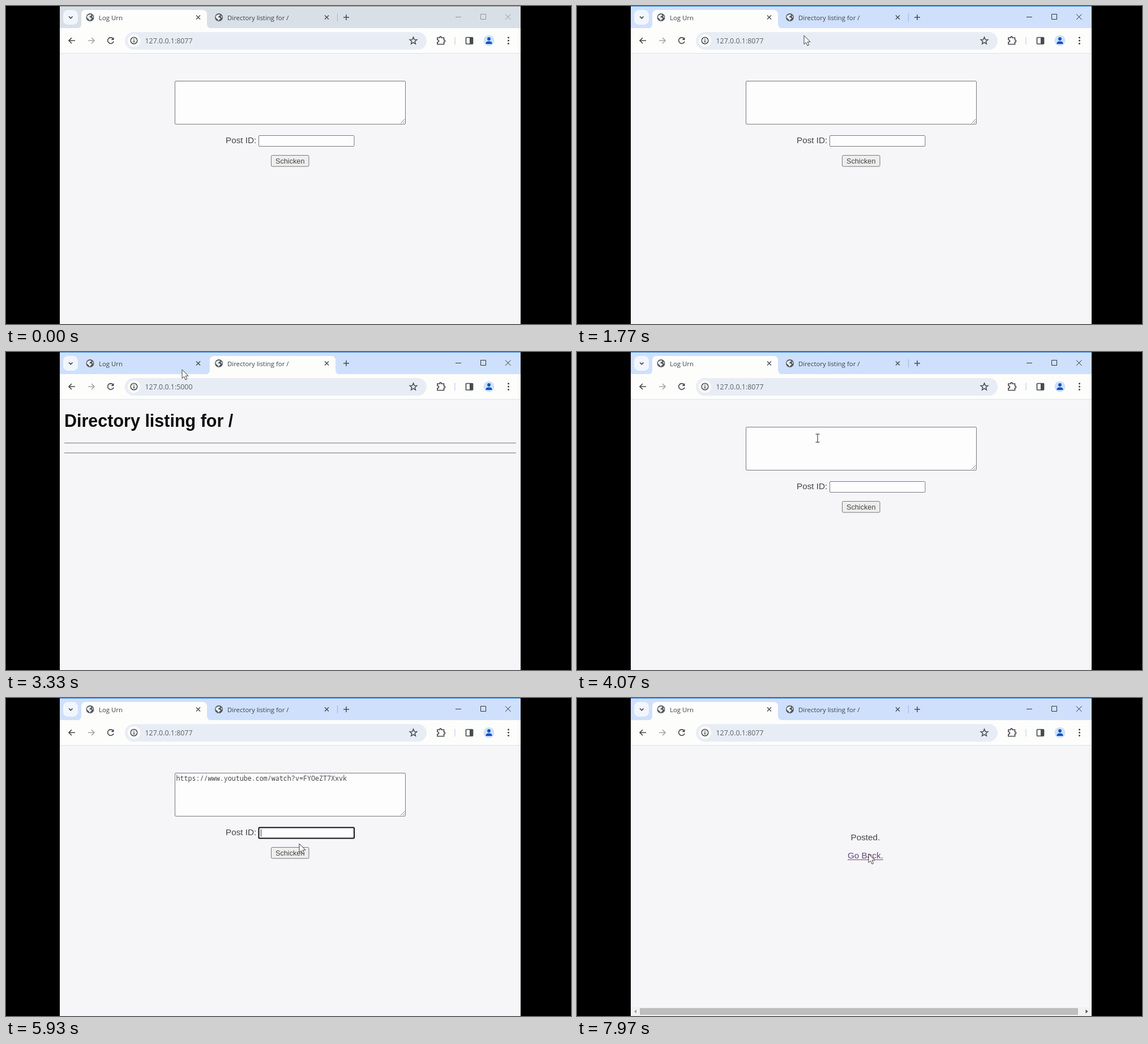
These frames come from a looping animation (998 px wide and 561 px high, 8000 ms). An HTML page:

```html
<!DOCTYPE html>
<html lang="de">
<head>
<meta charset="utf-8">
<title>Browser</title>
<style>
  html, body { margin: 0; width: 100%; height: 100%; overflow: hidden; background: #000; }
  svg { display: block; width: 100vw; height: 100vh; }
  text { font-family: "Liberation Sans", Arial, sans-serif; font-size: 15.27px; fill: #444; white-space: pre; }
  .tabtext { font: 11.4px "Open Sans", sans-serif; fill: #3d4248; }
  .url { font: 12.4px "Open Sans", sans-serif; fill: #5c6167; }
  .typed { font: 11.7px "Noto Sans Mono", monospace; fill: #444; }
  .button { font-size: 12.7px; }
  .heading { font-size: 30.5px; font-weight: bold; fill: #0c0c0c; }
  .line { fill: none; stroke: #464a4e; stroke-width: 1.7; }
  .field { fill: #fdfdfd; stroke: #777780; stroke-width: 1; }
  .field.focus { stroke: #101010; stroke-width: 2; }
  #controls { fill: none; stroke: #333; stroke-width: 1; }
  .inactive #controls { stroke: #92979d; }
  #strip { fill: #cfe0fd; }
  .inactive #strip { fill: #d9dfe7; }
  #topline { fill: #3b87d8; }
  .inactive #topline { fill: #8a8f96; }
</style>
</head>
<body>
<svg id="stage" viewBox="0 0 998 561" preserveAspectRatio="none">
  <defs>
    <clipPath id="windowClip"><path d="M95 0H909V561H95z"/></clipPath>
    <g id="globe">
      <circle r="7" fill="#51565b"/>
      <path d="M-5.4-2.5Q-2-6 1.5-5.2L2-3 -.5-2 -1 0 2 .5 3 2.5 1 3.5 0 5.8Q-1.6 5.6-2 3.5L-5.6.5zM3.5-3.8L5.5-1.5 5.7 1 4 0z" fill="#e9edf2"/>
    </g>
    <path id="cross" class="line" d="M-3.5-3.5L3.5 3.5M3.5-3.5L-3.5 3.5" style="stroke-width:1.4"/>
  </defs>

  <g clip-path="url(#windowClip)">
    <rect x="95" width="814" height="561" fill="#f6f6f8"/>
    <rect id="strip" x="95" width="814" height="40"/>
    <rect id="topline" x="95" width="814" height="1"/>

    <rect x="101" y="7" width="26" height="26" rx="8.5" fill="#f1f6fe"/>
    <path class="line" d="M111 18.5l3.3 3.2 3.3-3.2"/>
    <path id="activeTab" d="M-8 39.5Q0 39.5 0 31V15Q0 7 8 7H214Q222 7 222 15V31Q222 39.5 230 39.5z" fill="#fdfdfc"/>
    <use href="#globe" x="148.500" y="20"/>
    <use href="#globe" x="376" y="20"/>
    <text class="tabtext" x="164" y="24.600">Log Urn</text>
    <text class="tabtext" x="391" y="24.600">Directory listing for /</text>
    <use href="#cross" x="339.500" y="20"/>
    <use href="#cross" x="566.500" y="20"/>
    <path id="tabDivider" d="M585.500 13V27" stroke="#a9bedc" stroke-width="1.3"/>
    <path class="line" d="M596 20H606M601 15V25" style="stroke-width:1.5"/>
    <path id="controls" d="M794 19.500H804M838.500 14.500h9v9h-9zM882 14.500l9.500 9.500M891.500 14.500L882 24"/>

    <rect x="95" y="39" width="814" height="44" fill="#fdfdfc"/>
    <path d="M95 83.500H909" stroke="#dce2ea"/>
    <rect x="210" y="46" width="533" height="31" rx="15.500" fill="#e8edf5"/>
    <path class="line" d="M122 61H111.500M116 56L111 61l5 5"/>
    <path class="line" d="M145 61H155.500M151 56l5 5-5 5" style="stroke:#a4a7ab"/>
    <path class="line" d="M189 57.500A5.300 5.300 0 1 0 190 62.500"/>
    <path d="M190.500 55v5h-5z" fill="#464a4e"/>
    <circle cx="226" cy="61" r="11" fill="#fdfdfc"/>
    <circle class="line" cx="226" cy="61" r="5.800" style="stroke-width:1.500"/>
    <path class="line" d="M226 60.300V64.500M226 57.500V59"/>
    <text class="url" id="url" x="245.500" y="65.500"></text>
    <path id="star" class="line" style="stroke-width:1.500"/>
    <path class="line" d="M762 56H766Q766 53.800 767.500 53.800T769 56H773.500V60Q775.500 60 775.500 61.800T773.500 63.500V67.500H762V64Q764.500 63.500 764.500 61.800T762 59.500z"/>
    <path d="M793 54.500V68" stroke="#cbdaf2" stroke-width="1.500"/>
    <rect class="line" x="812.500" y="55.500" width="12" height="11.500" rx="1"/>
    <path d="M819 55.500h5.500v11.500h-5.500z" fill="#464a4e"/>
    <circle cx="853" cy="61" r="9.500" fill="#cfe1fc"/>
    <circle cx="853" cy="58" r="2.900" fill="#1253c0"/>
    <path d="M847.500 67V65.500Q848 62.300 853 62.300T858.500 65.500V67z" fill="#1253c0"/>
    <path d="M887.500 55.800h.01M887.500 61h.01M887.500 66.200h.01" stroke="#3f4347" stroke-width="3" stroke-linecap="round"/>

    <g id="formPage">
      <rect id="area" class="field" x="298.500" y="132.500" width="407" height="76" rx="1.500"/>
      <path d="M697 207l7.500-7.500M701 207l3.500-3.500" stroke="#777" stroke-width=".9"/>
      <text class="typed" id="link" x="300.500" y="146">https://www.youtube.com/watch?v=FYOeZT7Xxvk</text>
      <text x="388" y="242.300">Post ID:</text>
      <rect id="postId" class="field" x="446.500" y="228.500" width="168.500" height="19" rx="1.500"/>
      <rect class="field" x="468.500" y="263.500" width="66.500" height="19.500" rx="2" style="fill:#eeeeed"/>
      <text class="button" x="476" y="277.500">Schicken</text>
      <path id="caret" d="M0-6.500V6.500" stroke="#333"/>
    </g>

    <g id="listPage">
      <text class="heading" x="103" y="131.500">Directory listing for /</text>
      <path d="M103 160.500H901M103 178H901" stroke="#999a98" stroke-width="1.300"/>
    </g>

    <g id="donePage">
      <text x="483.500" y="250.800">Posted.</text>
      <text x="478" y="283.300" style="fill:#67437f">Go Back.</text>
      <path d="M478 285.300H541" stroke="#67437f"/>
      <rect x="95" y="545" width="814" height="16" fill="#f2f2f2"/>
      <rect x="111" y="547" width="774" height="12" fill="#bebebe"/>
      <path d="M105 549.500v7l-4-3.500z" fill="#a0a0a0"/>
      <path d="M898.500 549.500v7l4-3.500z" fill="#4c4c4c"/>
    </g>

    <path id="arrow" d="M0 0V15.500L3.600 12.200 6 18 8.700 16.800 6.200 11.200H11z" fill="#fdfdfd" stroke="#3c3c3c" stroke-width="1"/>
    <path id="beam" d="M-3.500-7.200H-1Q0-7 0-6 0-7 1-7.200H3.500M0-6V6M-3.500 7.200H-1Q0 7 0 6 0 7 1 7.200H3.500" fill="none" stroke="#484848" stroke-width="1.200"/>
  </g>
</svg>
<script>
  const LOOP = 8000;
  const ACTIVATE = 960, OPEN_LIST = 2030, OPEN_FORM = 3600;
  const FOCUS_AREA = 4350, PASTE = 4950, FOCUS_ID = 5580, POSTED = 7700;

  // Pointer stops: time, x, y
  const stops = [
    [760, 84, 438], [1030, 264, 196], [1200, 283, 176], [1550, 330, 122],
    [1900, 432, 21], [2100, 432, 21], [2430, 376, 99], [2720, 330, 140],
    [3050, 330, 96], [3330, 311, 31], [3500, 246, 20], [3660, 246, 20],
    [4070, 425, 152], [4300, 421, 149], [5200, 421, 149], [5520, 522, 238],
    [5650, 522, 239], [5930, 518, 257], [6450, 515, 274], [7000, 515, 275]
  ];

  const $ = id => document.getElementById(id);
  const show = (id, on) => $(id).style.display = on ? "" : "none";
  const place = (id, x, y) => $(id).setAttribute("transform", `translate(${x} ${y})`);
  const inside = (x, y, l, t, r, b) => x > l && x < r && y > t && y < b;

  $("star").setAttribute("d", "M" + Array.from({ length: 10 }, (_, i) => {
    const radius = i % 2 ? 2.9 : 6.6, a = i * Math.PI / 5;
    return `${719.5 + radius * Math.sin(a)} ${61.5 - radius * Math.cos(a)}`;
  }).join("L") + "z");

  function pointerAt(t) {
    const i = stops.findIndex(s => s[0] > t);
    if (i < 0) return stops[stops.length - 1].slice(1);
    if (i === 0) return stops[0].slice(1);
    const [t0, x0, y0] = stops[i - 1], [t1, x1, y1] = stops[i];
    const k = (t - t0) / (t1 - t0), e = k * k * (3 - 2 * k);
    return [x0 + (x1 - x0) * e, y0 + (y1 - y0) * e];
  }

  function draw(t) {
    const list = t >= OPEN_LIST && t < OPEN_FORM;
    const done = t >= POSTED;
    const form = !list && !done;
    const onId = t >= FOCUS_ID, onArea = t >= FOCUS_AREA && !onId;

    $("stage").classList.toggle("inactive", t < ACTIVATE);
    place("activeTab", list ? 360 : 133, 0);
    show("tabDivider", !list);
    $("url").textContent = "127.0.0.1:" + (list ? 5000 : 8077);
    show("formPage", form);
    show("listPage", list);
    show("donePage", done);

    show("link", t >= PASTE);
    $("area").classList.toggle("focus", onArea);
    $("postId").classList.toggle("focus", onId);
    const since = t - (onId ? FOCUS_ID : t >= PASTE ? PASTE : FOCUS_AREA);
    show("caret", (onId || onArea) && since % 1060 < 530);
    if (onId) place("caret", 450.5, 238);
    else place("caret", t >= PASTE ? 603.5 : 301.5, 142);

    const [x, y] = pointerAt(t);
    const overText = form && (inside(x, y, 298, 132, 706, 209) || inside(x, y, 446, 228, 615, 248));
    show("arrow", t >= stops[0][0] && !overText);
    show("beam", overText);
    place("arrow", Math.round(x), Math.round(y));
    place("beam", Math.round(x), Math.round(y));
  }

  const start = performance.now();
  function tick() {
    draw((performance.now() - start) % LOOP);
    requestAnimationFrame(tick);
  }
  tick();
</script>
</body>
</html>
```
